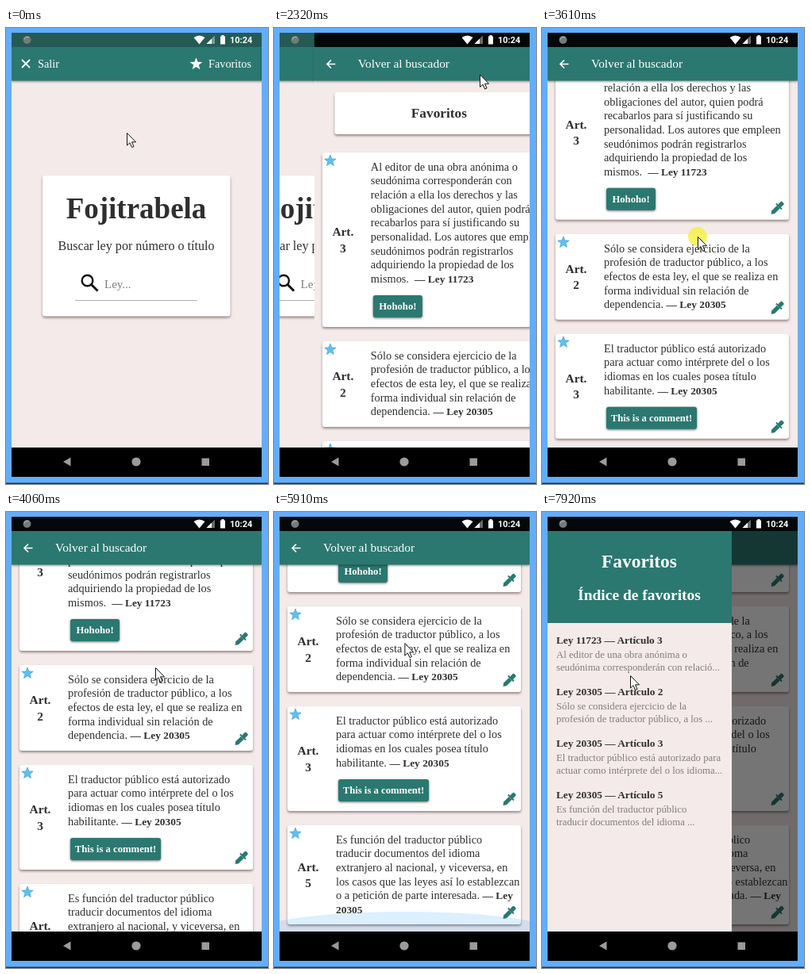
Write an HTML page that moves like this. It is 330x575 px and loops after 8000 ms.

```html
<!DOCTYPE html>
<html lang="es">
<head>
<meta charset="utf-8">
<style>
  html, body { margin: 0; width: 100%; height: 100%; overflow: hidden; }
  svg { display: block; }
  text { font-family: "Liberation Serif", "Times New Roman", serif; font-size: 14.3px; fill: #2f2f2f; }
  .b { font-weight: bold; }
  .mid { text-anchor: middle; }
  .w { fill: #fff; }
  .law { font-weight: bold; font-size: 13.4px; }
  .card { fill: #fff; filter: drop-shadow(.5px 2px 1.8px rgba(60, 35, 35, .5)); }
  .bar { fill: #2b7870; filter: drop-shadow(0 1px 1.5px rgba(0, 0, 0, .45)); }
  .teal { fill: #2b7870; }
  .pink { fill: #f4eae9; }
  .button { fill: #2b7870; filter: drop-shadow(.5px 1.5px 1.5px rgba(0, 0, 0, .55)); }
</style>
</head>
<body>
<svg id="stage" width="330" height="575" viewBox="0 0 330 575"></svg>
<script>
const DURATION = 8000;
const LIST_END = 276, FIRST_STOP = 202;
const DRAWER_WIDTH = 232;

const rect = (x, y, w, h, cls, r = 0) =>
  `<rect x="${x}" y="${y}" width="${w}" height="${h}" rx="${r}" class="${cls}"/>`;
const text = (x, y, str, size = 14.3, cls = '', style = '') =>
  `<text x="${x}" y="${y}" class="${cls}" style="font-size:${size}px;${style}">${str}</text>`;

function star(x, y, r, attrs) {
  const points = Array.from({ length: 10 }, (_, i) => {
    const a = i * Math.PI / 5, d = i % 2 ? r * .42 : r;
    return `${x + d * Math.sin(a)},${y - d * Math.cos(a)}`;
  });
  return `<polygon points="${points.join(' ')}" ${attrs}/>`;
}

const pen = (x, y) => `<g class="teal" transform="translate(${x} ${y}) rotate(45)">
  <path d="M-2.6-2.5H2.6V7L0 10.5L-2.6 7Z"/><path d="M-5-4.5H5V-2.5H-5Z"/>
  <rect x="-2.6" y="-10.5" width="5.2" height="6.5" rx="1.2"/></g>`;

const law = number => `<tspan class="law">— Ley ${number}</tspan>`;

const articles = [
  { number: 3, law: 11723, top: 157, height: 220, comment: 'Hohoho!', buttonWidth: 62, lines: [
    'Al editor de una obra anónima o', 'seudónima corresponderán con', 'relación a ella los derechos y las',
    'obligaciones del autor, quien podrá', 'recabarlos para sí justificando su',
    'personalidad. Los autores que empleen', 'seudónimos podrán registrarlos',
    'adquiriendo la propiedad de los', `mismos.\u00a0 ${law(11723)}`] },
  { number: 2, law: 20305, top: 395, height: 108, lines: [
    'Sólo se considera ejercicio de la', 'profesión de traductor público, a los',
    'efectos de esta ley, el que se realiza en', 'forma individual sin relación de',
    `dependencia. ${law(20305)}`] },
  { number: 3, law: 20305, top: 521, height: 132, comment: 'This is a comment!', buttonWidth: 114, lines: [
    'El traductor público está autorizado', 'para actuar como intérprete del o los',
    'idiomas en los cuales posea título', `habilitante. ${law(20305)}`] },
  { number: 5, law: 20305, top: 671, height: 125, lines: [
    'Es función del traductor público', 'traducir documentos del idioma',
    'extranjero al nacional, y viceversa, en', 'los casos que las leyes así lo establezcan',
    'o a petición de parte interesada. <tspan class="law">— Ley</tspan>', '<tspan class="law">20305</tspan>'] }
];

const summaries = [
  ['Al editor de una obra anónima o', 'seudónima corresponderán con relació...'],
  ['Sólo se considera ejercicio de la', 'profesión de traductor público, a los ...'],
  ['El traductor público está autorizado para', 'actuar como intérprete del o los idioma...'],
  ['Es función del traductor público', 'traducir documentos del idioma ...']
];

function articleCard({ number, top, height, lines, comment, buttonWidth }) {
  const middle = top + height / 2, bottom = top + height;
  return rect(17, top, 294, height, 'card', 3) +
    star(27, top + 10.5, 7.5, 'fill="#5cc0f2" stroke="#3f9fd0" stroke-width=".7"') +
    text(43, middle - 5, 'Art.', 15.4, 'b mid') + text(43, middle + 15.5, number, 15.4, 'b mid') +
    lines.map((line, i) => text(78, top + 22.8 + i * 17.65, line)).join('') +
    (comment ? rect(81, bottom - 40, buttonWidth, 28, 'button', 3) +
      text(81 + buttonWidth / 2, bottom - 22, comment, 12.7, 'b mid w') : '') +
    pen(296, bottom - 14.5);
}

const home = `
  ${rect(7, 6, 315, 523, 'pink')}
  ${rect(7, 24, 315, 42.5, 'bar')}
  <rect x="7" y="6" width="315" height="18" fill="#255b54"/>
  <circle id="ripple" cx="264" cy="45" fill="#fff" clip-path="url(#barClip)"/>
  <path d="M20 40l10 10m0-10l-10 10" stroke="#fff" stroke-width="1.8"/>
  ${text(40, 50, 'Salir', 14.3, 'w')}
  ${star(239.5, 45.5, 8.3, 'fill="#fff"')}
  ${text(255, 50, 'Favoritos', 14.3, 'w')}
  ${rect(46, 186, 236.5, 177.5, 'card', 3)}
  ${text(164, 240, 'Fojitrabela', 37, 'b mid')}
  ${text(164, 280, 'Buscar ley por número o título', 16.1, 'mid')}
  <circle cx="102.5" cy="318.5" r="6.8" fill="none" stroke="#111" stroke-width="2.4"/>
  <path d="M107.5 323.5l8 8" stroke="#111" stroke-width="3"/>
  ${text(124, 328, 'Ley...', 15, '', 'fill:#7d7d7d')}
  <path d="M87 343.5H241" stroke="#b5b1b1"/>`;

const favourites = `
  ${rect(7, 24, 315, 505, 'pink')}
  <g clip-path="url(#listClip)">
    <g id="list">
      ${rect(32.5, 81, 263, 53, 'card', 3)}
      ${text(164, 113, 'Favoritos', 17.3, 'b mid')}
      ${articles.map(articleCard).join('')}
    </g>
    <ellipse id="glow" cx="164.5" cy="529" rx="185" fill="#2196f3"/>
  </g>
  ${rect(7, 24, 315, 42.5, 'bar')}
  <rect x="7" y="6" width="315" height="18" fill="#050808"/>
  <path d="M33.5 45.5H23M28 40.5l-5 5l5 5" fill="none" stroke="#fff" stroke-width="1.7"/>
  ${text(62, 50, 'Volver al buscador', 15.4, 'w')}`;

const drawer = `
  ${rect(7, 24, DRAWER_WIDTH, 505, 'pink')}
  ${rect(7, 24, DRAWER_WIDTH, 116, 'teal')}
  ${text(122.5, 70, 'Favoritos', 23.4, 'b mid w')}
  ${text(122.5, 111, 'Índice de favoritos', 19.5, 'b mid w')}
  ${summaries.map((lines, i) => {
    const y = 166 + i * 65.1, { law, number } = articles[i];
    return text(18, y, `Ley ${law} — Artículo ${number}`, 13.3, 'b') +
      lines.map((line, j) => text(18, y + 18 + j * 16, line, 12.75, '', 'fill:#827c7c')).join('');
  }).join('')}`;

const stage = document.getElementById('stage');
stage.innerHTML = `
  <defs>
    <clipPath id="screenClip"><rect x="7" y="6" width="315" height="523"/></clipPath>
    <clipPath id="listClip"><rect x="7" y="66" width="315" height="463"/></clipPath>
    <clipPath id="barClip"><rect x="7" y="24" width="315" height="42"/></clipPath>
  </defs>
  <rect width="330" height="575" fill="#62aefe"/>
  <rect y="573.5" width="330" height="1.5" fill="#1d3850"/>
  <g clip-path="url(#screenClip)">
    <g id="home">${home}</g>
    <g id="favourites">${favourites}</g>
    <rect id="scrim" x="7" y="24" width="315" height="505"/>
    <g id="drawer">${drawer}</g>
  </g>
  <circle cx="26.5" cy="15" r="5" fill="#737b7b"/>
  <path d="M23 14.500a4 4 0 0 1 6-2.500" fill="none" stroke="#b4baba"/>
  <path d="M236.5 12q7-5 14 0l-7 8.500z" fill="#fff"/>
  <path d="M263 9.500V20H252.500z" fill="#fff" opacity=".4"/><path d="M259 13.500V20H252.500z" fill="#fff"/>
  <path d="M270 10.500h1.500V9h3v1.500H276V20.500H270z" fill="#fff"/>
  <text x="282" y="19" class="w b" style="font:bold 11px Roboto,sans-serif">10:24</text>
  <rect x="7" y="529" width="315" height="37"/>
  <g fill="#9b9b9b">
    <path d="M72 547l9.500-5.500v11z"/><circle cx="164" cy="547" r="5.600"/><rect x="246.500" y="542.500" width="9.500" height="9.500"/>
  </g>
  <g id="pointer">
    <circle id="press" r="12" fill="#f6f03c" opacity=".8"/>
    <path d="M.5 .5V16L4 12.700L6.600 18.500L9 17.500L6.500 11.800H11.500Z" fill="#fff" stroke="#111"/>
  </g>`;

const part = Object.fromEntries([...stage.querySelectorAll('[id]')].map(el => [el.id, el]));

const clamp = (v, lo = 0, hi = 1) => Math.min(hi, Math.max(lo, v));
const span = (t, from, to) => clamp((t - from) / (to - from));
const smooth = p => p * p * (3 - 2 * p);
const move = (el, x, y = 0) => el.setAttribute('transform', `translate(${x} ${y})`);

// Pointer stops: time, x, y
const pointerPath = [
  [0, 152, 132], [190, 152, 132], [450, 172, 149], [1000, 255, 80], [1370, 260.5, 49],
  [2250, 260.5, 49], [2930, 213, 360], [2970, 213, 360], [3150, 212, 398], [3900, 188, 196],
  [4160, 188, 196], [4900, 206, 425], [5200, 202, 398], [5600, 190, 158],
  [5750, 190, 158], [6430, 9, 208], [6600, 3, 212], [6880, 185, 213], [7000, 185, 213],
  [7800, 111, 206], [8000, 111, 206]
];
const presses = [[1530, 1650], [3150, 3900], [4900, 5600], [6600, 6890]];

function pointerAt(t) {
  const i = pointerPath.findIndex(stop => stop[0] > t);
  const [t0, x0, y0] = pointerPath[i - 1], [t1, x1, y1] = pointerPath[i];
  const p = smooth(span(t, t0, t1));
  return [x0 + (x1 - x0) * p, y0 + (y1 - y0) * p];
}

function scrollAt(t, y) {
  if (t < 3150) return 0;
  if (t < 3900) return clamp(398 - y, 0, FIRST_STOP);
  if (t < 4900) return FIRST_STOP;
  if (t < 5600) return clamp(FIRST_STOP + 425 - y, FIRST_STOP, LIST_END);
  return LIST_END;
}

function draw(now) {
  const t = now % DURATION;
  const [x, y] = pointerAt(t);
  move(part.pointer, x, y);
  part.press.style.display = presses.some(([from, to]) => t >= from && t < to) ? '' : 'none';

  const slide = smooth(span(t, 1900, 2450));
  move(part.home, -105 * slide);
  move(part.favourites, 315 * (1 - slide));
  part.ripple.setAttribute('r', 10 + 33 * span(t, 1550, 1900));
  part.ripple.setAttribute('opacity', t < 1550 ? 0 : .1 * (1 - span(t, 1950, 2250)));

  move(part.list, 0, -scrollAt(t, y));
  const glow = span(t, 5350, 5600) * (1 - smooth(span(t, 5620, 6250)));
  part.glow.setAttribute('ry', 45 * glow);
  part.glow.setAttribute('opacity', .28 * glow);

  const open = smooth(span(t, 6760, 7260));
  move(part.drawer, -DRAWER_WIDTH * (1 - open));
  part.scrim.setAttribute('opacity', .54 * open);
  requestAnimationFrame(draw);
}
requestAnimationFrame(draw);
</script>
</body>
</html>
```
